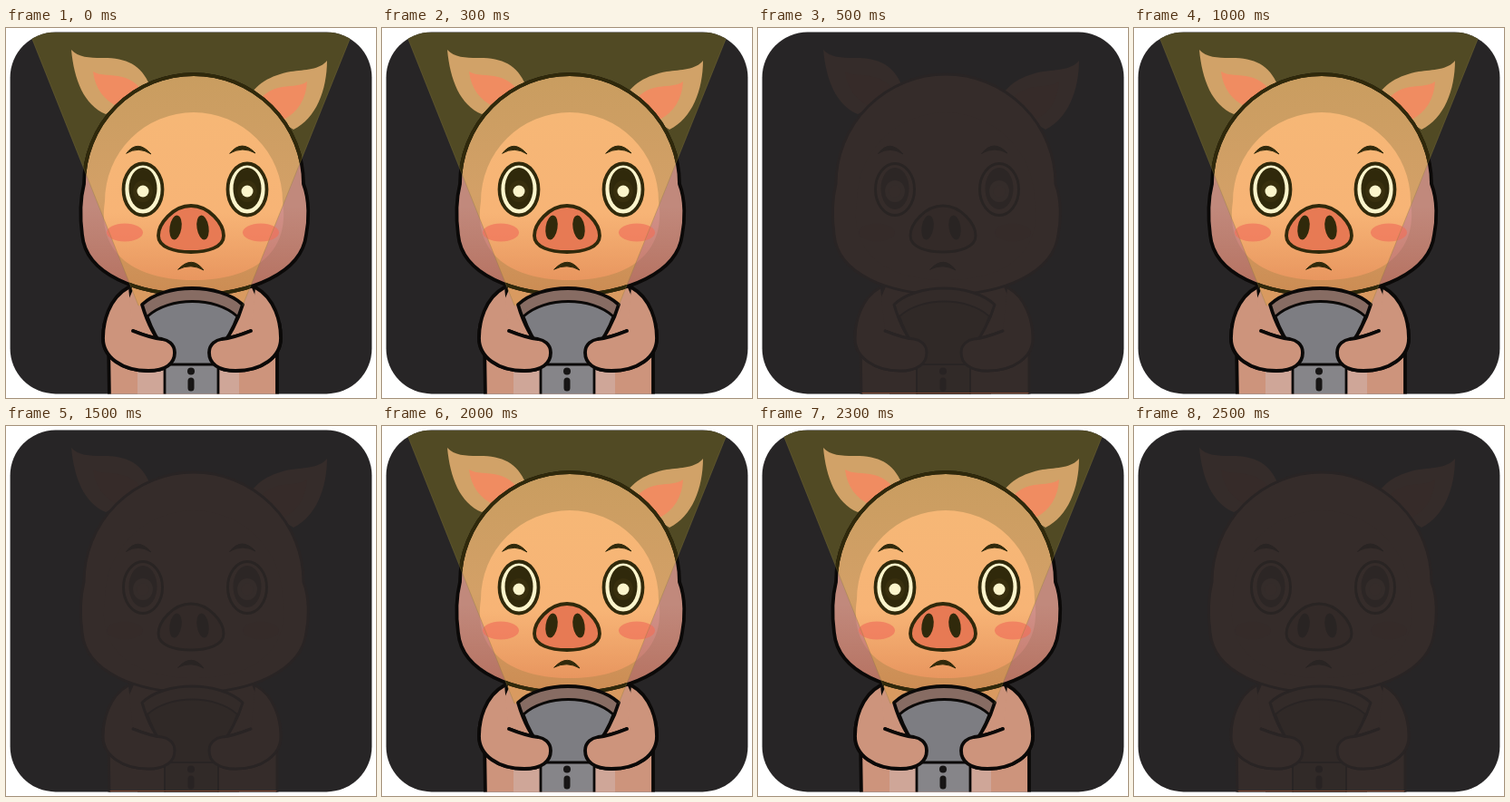
Write an HTML page that moves like this. It is 408 px wide and 408 px high and loops after 3 s.

```html
<!DOCTYPE html>
<html>
<head>
<meta charset="utf-8">
<style>
html, body { margin: 0; width: 100%; height: 100%; overflow: hidden; background: #fff; }
svg { display: block; width: 100vw; height: 100vh; }
</style>
</head>
<body>
<svg id="stage" viewBox="0 0 408 408"></svg>
<script>
const CONE = 'M26 5L146 306L261 306L382 5Z';
const HEAD = 'M86 172A121 121 0 0 1 328 172C335 190 334 213 331 228C326 270 270 294 207 294C145 294 88 272 84 228C81 205 82 188 86 172Z';
const FACE = 'M109 191A98 98 0 0 1 305 191C314 250 270 278 207 278C144 278 100 250 109 191Z';
const EAR_L = 'M72 24C81 34 98 33 112 33C136 34 152 43 160 68L110 95C86 85 75 57 72 24Z';
const EAR_R = 'M354 36C346 46 330 46 314 48C292 52 274 62 266 80L317 112C342 100 354 68 354 36Z';
const INNER_L = 'M96 48C104 53 116 51 128 54C140 57 148 64 150 72L124 87C108 80 98 66 96 48Z';
const INNER_R = 'M332 59C324 65 312 63 300 66C288 69 281 76 277 85L306 101C322 93 331 78 332 59Z';
const BODY = 'M140 284L113 345L114 410H299L299 345L272 284Z';
const BELLY = 'M145 370H257V410H145Z';
const TORCH = 'M150 305C175 281 235 281 261 305C256 322 246 342 234 354V372H176V354C164 342 155 322 150 305Z';
const LENS = 'M156 318C180 296 231 296 255 318C250 332 242 345 234 354V372H176V354C168 345 161 332 156 318Z';
const ARM = 'M135 286C113 298 107 325 107 342C107 363 128 378 157 378C176 378 186 370 186 358C186 348 178 344 172 343C160 342 150 338 140 334';
const SNOUT = 'M204 196C224 196 240 216 240 229C240 242 222 247 204 247C186 247 168 242 168 229C168 216 184 196 204 196Z';
const BROWS = 'M133 138Q145 122 160 139Q146 130 133 138ZM247 138Q260 122 275 138Q261 130 247 138Z';
const MOUTH = 'M190 266Q205 250 218 267Q204 259 190 266Z';

const lit = {
  line: '#0b0908', faceLine: '#30290b', ear: '#d1a268', inner: '#f08c61',
  rim: 'url(#rim)', face: 'url(#face)', glowRim: 'url(#glowRim)', glow: 'url(#glow)',
  skin: '#cd947c', belly: '#cfa698', cheek: '#f0705a', white: '#fcf5cc', iris: '#30290b', ring: '#382f0e',
  snout: '#e77a54', hole: '#30290b', brim: '#876c63', metal: '#7d7d82', grip: '#868589',
  mark: '#171515', w: 3.8
};
const skin = '#352c2a', shade = '#2c2625';
const dim = {
  line: '#292424', faceLine: '#292423', ear: skin, inner: '#362b29',
  rim: skin, face: skin, skin, belly: skin, cheek: skin, white: skin, iris: shade, ring: '#342c2a',
  snout: '#332a28', hole: '#292423', brim: '#332b29', metal: '#302927', grip: '#312a28',
  mark: '#282323', w: 3
};

const path = (d, fill, line = 'none', w = 0, more = '') =>
  `<path d="${d}" fill="${fill}" stroke="${line}" stroke-width="${w}" stroke-linecap="round" stroke-linejoin="round" ${more}/>`;
const oval = (x, y, rx, ry, fill, line = 'none', w = 0, more = '') =>
  `<ellipse cx="${x}" cy="${y}" rx="${rx}" ry="${ry}" fill="${fill}" stroke="${line}" stroke-width="${w}" ${more}/>`;

const eye = (x, p) =>
  oval(x, 178, 21.5, 28.5, p.white, p.faceLine, p.w) +
  oval(x, 177, 15.5, 23, p.iris) + oval(x, 180, 11, 12, p.ring) +
  oval(x, 180, 6.5, 6.5, p.white);
const nostril = (x, tilt, p) =>
  oval(x, 220, 6.5, 13.5, p.hole, 'none', 0, `transform="rotate(${tilt} ${x} 220)"`);

function pig(p) {
  const w = p.w, beam = 'clip-path="url(#cone)"';
  let s = path(EAR_L, p.ear) + path(EAR_R, p.ear) + path(INNER_L, p.inner) + path(INNER_R, p.inner);
  s += path(BODY, p.skin, p.line, w) + path(BELLY, p.belly);
  for (const side of ['', 'transform="translate(410 0) scale(-1 1)"']) s += path(ARM, p.skin, p.line, w, side);
  if (p.glow) s += path(BODY, '#d99a60', 'none', 0, beam);
  s += path(HEAD, p.rim) + path(FACE, p.face);
  if (p.glow) s += path(HEAD, p.glowRim, 'none', 0, beam) + path(FACE, p.glow, 'none', 0, beam);
  s += path(HEAD, 'none', p.line, w);
  if (p.glow) s += path(HEAD, 'none', p.faceLine, w, beam);
  s += oval(131, 225.5, 20, 10, p.cheek, 'none', 0, 'opacity=".68"');
  s += oval(281, 225.5, 20, 10, p.cheek, 'none', 0, 'opacity=".68"');
  s += eye(151, p) + eye(266, p);
  s += path(BROWS, p.faceLine, p.faceLine, 1) + path(MOUTH, p.faceLine, p.faceLine, 1);
  s += path(SNOUT, p.snout, p.faceLine, w) + nostril(187, 9, p) + nostril(217, -9, p);
  s += path(TORCH, p.brim, p.line, w) + path(LENS, p.metal, p.line, w - 1);
  s += path('M175 371H234V410H175Z', p.grip, p.line, w - 1);
  s += oval(204, 378.5, 4, 4, p.mark) + path('M204 389V397', 'none', p.mark, 7);
  for (const side of ['', 'transform="translate(410 0) scale(-1 1)"']) s += path(ARM, p.skin, p.line, w, side + ' clip-path="url(#hand)"');
  return s;
}

const fade = (id, stops) =>
  `<linearGradient id="${id}" x1="0" y1="0" x2="0" y2="1">` +
  stops.map(([at, c]) => `<stop offset="${at}" stop-color="${c}"/>`).join('') + '</linearGradient>';

const stage = document.getElementById('stage');
stage.innerHTML = `<defs>
  <clipPath id="card"><rect x="4.6" y="4.6" width="398.8" height="398.8" rx="50"/></clipPath>
  <clipPath id="cone"><path d="${CONE}"/></clipPath>
  <clipPath id="hand"><rect x="100" y="325" width="100" height="60"/></clipPath>
  ${fade('rim', [[0, '#c1897c'], [.6, '#c1897c'], [1, '#b5705f']])}
  ${fade('face', [[0, '#d2928a'], [.6, '#d09088'], [1, '#c67a6a']])}
  ${fade('glowRim', [[0, '#c99d60'], [.55, '#d3a067'], [1, '#cc8c53']])}
  ${fade('glow', [[0, '#f6b776'], [.6, '#f7b476'], [1, '#e8965f']])}
  </defs>
  <g clip-path="url(#card)">
    <rect width="408" height="408" fill="#272526"/>
    <g id="on">${path(CONE, '#514a24')}${pig(lit)}
      ${path('M26 5L146 306M382 5L261 306', 'none', '#8a7b3c', 1, 'opacity=".35"')}</g>
    <g id="off">${pig(dim)}${path('M115 402.5H298', 'none', '#7b452f', 1)}</g>
  </g>`;
const on = document.getElementById('on'), off = document.getElementById('off');

function draw(ms) {
  const isLit = Math.floor(ms % 3000 / 500) % 2 === 0;
  on.style.display = isLit ? '' : 'none';
  off.style.display = isLit ? 'none' : '';
}
function tick() {
  draw(performance.now());
  requestAnimationFrame(tick);
}
tick();
</script>
</body>
</html>
```
